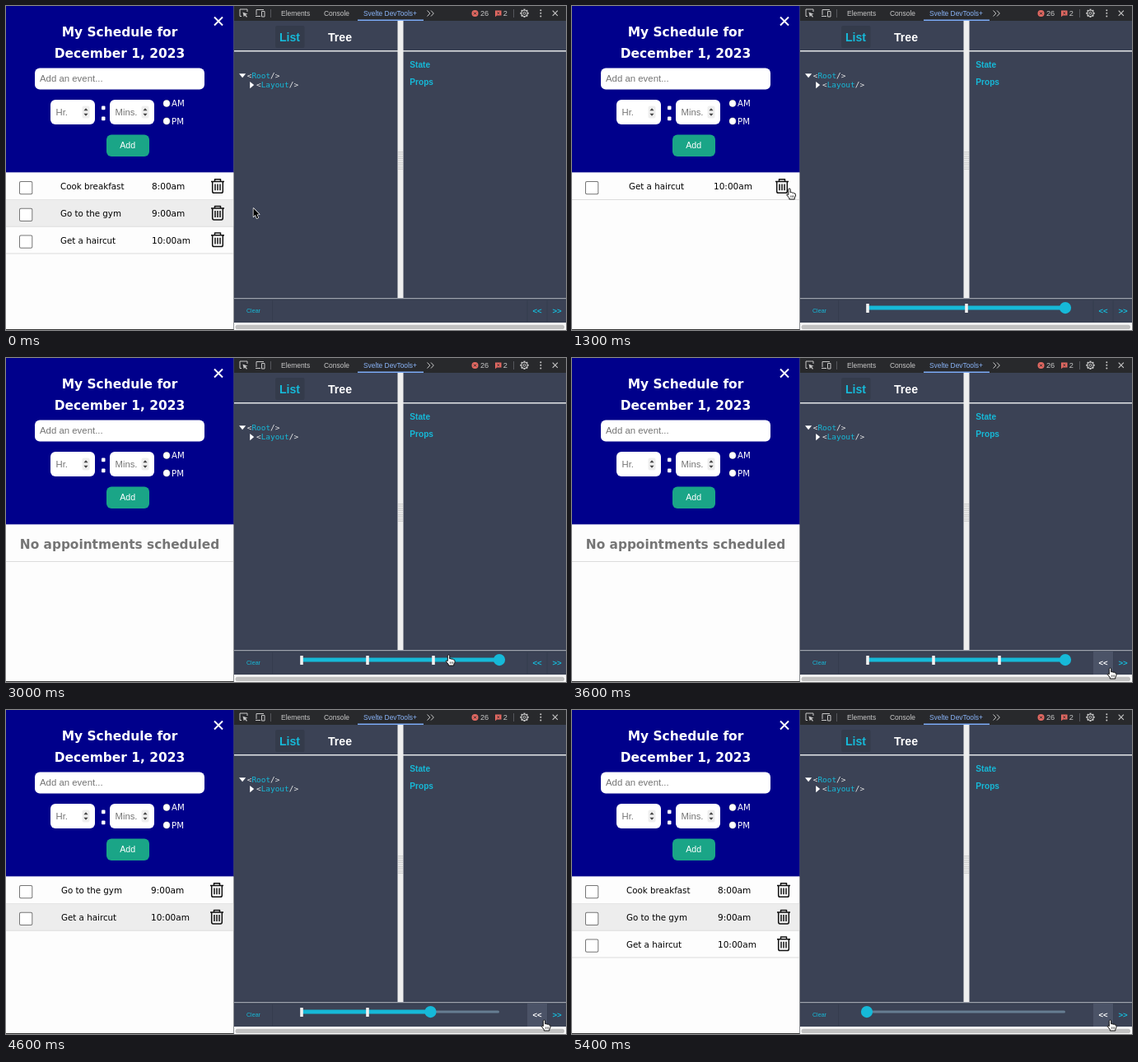
An HTML page with a canvas for the animation above (5700 ms loop, 680 by 394 pixels).

```html
<!DOCTYPE html>
<html lang="en">
<head>
<meta charset="utf-8">
<title>Schedule time travel</title>
<style>
html, body { margin: 0; width: 100%; height: 100%; overflow: hidden; background: #fdfdfd; }
canvas { display: block; }
</style>
</head>
<body>
<canvas id="stage" width="680" height="394"></canvas>
<script>
const ctx = document.getElementById('stage').getContext('2d');
const LOOP = 5700, STEP = 100;
const ARIAL = '"Liberation Sans", Arial, sans-serif';
const VERDANA = '"DejaVu Sans", Verdana, sans-serif';
const MONO = '"DejaVu Sans Mono", monospace';
const CYAN = '#16b9d8', PANEL = '#3b4255';
const EVENTS = [['Cook breakfast', '8:00am'], ['Go to the gym', '9:00am'], ['Get a haircut', '10:00am']];

// [time, x, y]
const CURSOR = [[0, 300.5, 246], [400, 264, 222], [2500, 264, 222], [3000, 537.5, 361],
  [3100, 551, 365], [3300, 551, 365], [3600, 653.5, 377]];
// [time, position]
const KNOB = [[500, 359], [800, 599], [3900, 599], [4100, 519], [4500, 519], [4800, 439], [5100, 439], [5400, 358]];
// [time, number of events left]
const LISTS = [[0, 3], [600, 2], [1300, 1], [1900, 0], [4000, 1], [4600, 2], [5200, 3]];
const SNAPSHOTS = [[0, 0], [600, 1], [1300, 2], [1900, 3]];

const smooth = p => p * p * (3 - 2 * p);
const snap = p => p < .5 ? 32 * p ** 6 : 1 - 32 * (1 - p) ** 6;
const held = (keys, t) => keys.filter(k => k[0] <= t).pop()[1];

function tween(keys, t, ease) {
  const i = keys.findIndex(k => k[0] > t);
  if (i < 0) return keys[keys.length - 1].slice(1);
  if (i === 0) return keys[0].slice(1);
  const a = keys[i - 1], b = keys[i], p = ease((t - a[0]) / (b[0] - a[0]));
  return a.slice(1).map((v, j) => v + (b[j + 1] - v) * p);
}

function rect(x, y, w, h, color, r = 0) {
  ctx.fillStyle = color;
  ctx.beginPath();
  ctx.roundRect(x, y, w, h, r);
  ctx.fill();
}
function disc(x, y, r, color) {
  ctx.fillStyle = color;
  ctx.beginPath();
  ctx.arc(x, y, r, 0, 7);
  ctx.fill();
}
function text(str, x, y, size, family, color, bold, align = 'left') {
  ctx.font = `${bold ? 'bold ' : ''}${size}px ${family}`;
  ctx.textAlign = align;
  ctx.fillStyle = color;
  ctx.fillText(str, x, y);
}
function path(d, stroke, width, fill, x = 0, y = 0) {
  const p = new Path2D(d);
  ctx.save();
  ctx.translate(x, y);
  ctx.lineJoin = 'round';
  if (fill) { ctx.fillStyle = fill; ctx.fill(p); }
  if (stroke) { ctx.strokeStyle = stroke; ctx.lineWidth = width; ctx.stroke(p); }
  ctx.restore();
}

function numberField(x, label) {
  rect(x, 114, 54, 30, '#fff', 6);
  text(label, x + 6.5, 133, 11.3, ARIAL, '#757575');
  rect(x + 38.5, 121.5, 9, 15, '#efefef', 2);
  path('M-2.6 -1.8L0 -4.8L2.6 -1.8ZM-2.6 1.8L0 4.8L2.6 1.8Z', null, 0, '#444', x + 43, 129);
}

function radio(y, label) {
  disc(195, y, 4.4, '#767676');
  disc(195, y, 3.9, '#fff');
  text(label, 201, y + 3.7, 10.2, VERDANA, '#fff');
}

function drawForm() {
  rect(0, 0, 276.5, 202.5, '#00008b');
  text('My Schedule for', 138, 37.3, 15.45, VERDANA, '#fff', true, 'center');
  text('December 1, 2023', 138, 62.5, 15.45, VERDANA, '#fff', true, 'center');
  path('M253 13.5L263 23.5M263 13.5L253 23.5', '#fff', 1.9);
  rect(35, 75.5, 206, 26, '#fff', 6);
  text('Add an event...', 41, 92.3, 11.4, ARIAL, '#757575');
  numberField(54, 'Hr.');
  numberField(126, 'Mins.');
  rect(116, 121.5, 4.5, 4.8, '#fff', 1);
  rect(116, 134.5, 4.5, 4.8, '#fff', 1);
  radio(118.5, 'AM');
  radio(140, 'PM');
  rect(122, 156.5, 52, 26.5, '#1aa587', 6);
  text('Add', 147.7, 173.3, 10.6, ARIAL, '#fff', false, 'center');
}

function drawList(count) {
  rect(0, 202.5, 276.5, 191.5, '#fdfdfd');
  if (!count) {
    text('No appointments scheduled', 138, 231.5, 15.35, VERDANA, '#757575', true, 'center');
    rect(0, 247, 276.5, 1, '#dcdcdc');
  }
  const nameX = [0, 69, 67, 66][count], timeX = [0, 172, 176, 177][count], trashX = [0, 255, 256, 257][count];
  EVENTS.slice(3 - count).forEach(([name, time], i) => {
    const y = 202.7 + i * 32.7;
    if (i % 2) rect(0, y, 276.5, 32.7, '#ededed');
    rect(0, y + 32.3, 276.5, 1, '#dcdcdc');
    rect(16, y + 10.3, 16.3, 16.3, '#767676', 2);
    rect(17, y + 11.3, 14.3, 14.3, '#fff', 1.2);
    text(name, nameX, y + 20.5, 10.3, VERDANA, '#000');
    text(time, timeX, y + 20.5, 10.5, VERDANA, '#000');
    path('M-8 3.5H8M-3.5 3.2V.8H3.5V3.2M-6.3 3.5V15.5Q-6.3 17.3 -4.5 17.3H4.5Q6.3 17.3 6.3 15.5V3.5' +
      'M-3 6.5V14.3M0 6.5V14.3M3 6.5V14.3', '#111', 1.5, null, trashX, y + 7.2);
  });
  rect(0, 393, 276.5, 1, '#333');
}

function drawToolbar() {
  const grey = '#c7c7c7';
  rect(277, 0, 403, 18, '#28292c');
  path('M286 12.5H284V4H293V7M284 4', grey, 1);
  path('M287.5 7.5L293.5 9.8L291 10.6L293 13L292 13.8L290 11.4L288.8 13.2Z', null, 0, grey);
  path('M304 11V4.5H313M303 12.5H309M310.5 6.5H314V13H310.5Z', grey, 1);
  rect(321, 4, 1, 10, '#55575c');
  text('Elements', 334, 12, 8.45, ARIAL, grey);
  text('Console', 386, 12, 8.45, ARIAL, grey);
  text('Svelte DevTools+', 434, 12, 8.4, ARIAL, '#8ab4f8');
  rect(427, 16.5, 80, 1.5, '#7cacf8');
  path('M511.5 5.5L514.8 9L511.5 12.5M516 5.5L519.3 9L516 12.5', grey, 1);
  disc(569.5, 9, 4, '#e46962');
  path('M568 7.5L571 10.5M571 7.5L568 10.5', '#28292c', 1);
  text('26', 576, 12.2, 9.2, ARIAL, grey);
  path('M594 5.5H601.5V11.5H596L594 13.3Z', null, 0, '#e46962');
  path('M596.3 7.3L599.3 9.9M599.3 7.3L596.3 9.9', '#28292c', .9);
  text('2', 603.7, 12.2, 9.2, ARIAL, grey);
  rect(616, 4, 1, 10, '#55575c');
  ctx.save();
  ctx.translate(629.5, 8.8);
  for (let i = 0; i < 8; i++, ctx.rotate(Math.PI / 4)) rect(-1, -5.2, 2, 2, grey);
  ctx.restore();
  path('M633.4 8.8a3.9 3.9 0 1 0 -7.8 0a3.9 3.9 0 1 0 7.8 0M631 8.8a1.5 1.5 0 1 0 -3 0a1.5 1.5 0 1 0 3 0', grey, 1);
  for (const y of [5.2, 8.8, 12.4]) disc(649.3, y, 1, grey);
  path('M663.7 5.7L669.9 11.9M669.9 5.7L663.7 11.9', grey, 1.1);
}

function tag(name, x, y) {
  const advance = 5.68, size = advance / .602;
  text('<', x, y, size, MONO, '#e8e8e8');
  text(name, x + advance, y, size, MONO, CYAN);
  text('/>', x + advance * (name.length + 1), y, size, MONO, '#e8e8e8');
}

function drawInspector() {
  rect(276.5, 0, 1, 394, '#55585f');
  rect(277, 18, 403, 368, PANEL);
  rect(327, 24, 35.5, 27, '#343b4b', 2);
  text('List', 332, 43.2, 14.1, ARIAL, CYAN, true);
  text('Tree', 391, 43.2, 14.1, ARIAL, '#fff', true);
  rect(277, 54, 403, 1.5, '#e4e6e8');
  path('M283 82.3H291.2L287.1 87.3Z', null, 0, '#fff');
  path('M296.2 92V100.2L301.2 96.1Z', null, 0, '#fff');
  tag('Root', 292.7, 88);
  tag('Layout', 304, 99.2);
  text('State', 490.3, 74.8, 10.15, ARIAL, CYAN, true);
  text('Props', 490.3, 96.4, 10.1, ARIAL, CYAN, true);
  rect(475.5, 18, 7, 338, '#eeeeee');
  for (let y = 177; y < 199; y += 2.6)
    for (const x of [477, 479, 481]) rect(x - .4, y, 1, 1.2, '#b0b0b0');
  rect(277, 355, 403, 1.6, '#9da2ac');
  rect(277, 356.6, 403, 1, '#31384a');
  rect(323, 358, 1, 26, '#353c4e');
  rect(277, 385, 403, 9, '#fafafa');
  rect(278.5, 387.8, 399.5, 5.2, '#c1c1c1', 2.6);
}

function drawPlayer(t, hoverBack) {
  text('Clear', 292, 373.2, 7.1, ARIAL, CYAN);
  rect(656.5, 358, 1, 26, '#353c4e');
  if (hoverBack) rect(633, 357, 24, 28, '#4b5367');
  else rect(632.5, 358, 1, 26, '#353c4e');
  text('<<', 645, 374, 9.6, ARIAL, hoverBack ? '#fff' : CYAN, true, 'center');
  text('>>', 669, 374, 9.6, ARIAL, CYAN, true, 'center');

  const count = held(SNAPSHOTS, t);
  if (!count) return;
  const [knob] = tween(KNOB, t, snap);
  rect(358, 365.6, 241, 3, '#667d92', 1.5);
  rect(358, 364.6, knob - 358, 5, CYAN, 2);
  for (let i = 0; i < count; i++) {
    const x = 359 + 240 * i / count;
    if (x <= knob) rect(x - 1.8, 362, 3.6, 11, '#f0f0f0', .5);
  }
  disc(knob, 367.1, 7.1, CYAN);
}

function drawCursor(x, y, hand) {
  if (hand) {
    path('M-1.2 7.5V1.2Q-1.2 0 0 0Q1.2 0 1.2 1.2V4.8Q2.6 4 3.5 5.2Q5 4.6 5.7 5.9Q7.5 5.6 7.5 7.4' +
      'V9.3L6.3 11.3V13H-.2V11.6L-3.3 7.8Q-3.4 6 -1.2 7.5Z', '#111', 1, '#fff', x, y);
    path('M1.8 8.4V10.8M3.6 8.4V10.8M5.3 8.4V10.8', '#222', .7, null, x, y);
  } else {
    path('M0 0V10.2L2.3 8.1L4 12.2L5.8 11.4L4.1 7.4H7.2Z', '#fff', 1.4, null, x, y);
    path('M0 0V10.2L2.3 8.1L4 12.2L5.8 11.4L4.1 7.4H7.2Z', null, 0, '#000', x, y);
  }
}

function draw(t) {
  const left = held(LISTS, t);
  const [x, y] = tween(CURSOR, t, smooth);
  const overTrash = left > 0 && x < 268;
  const overSlider = y > 358 && x < 606;
  const overBack = y > 358 && x > 633;
  drawForm();
  drawList(left);
  drawInspector();
  drawToolbar();
  drawPlayer(t, overBack);
  drawCursor(x, y, overTrash || overSlider || overBack);
}

function tick() {
  draw(Math.floor(performance.now() % LOOP / STEP) * STEP);
  requestAnimationFrame(tick);
}
tick();
</script>
</body>
</html>
```
